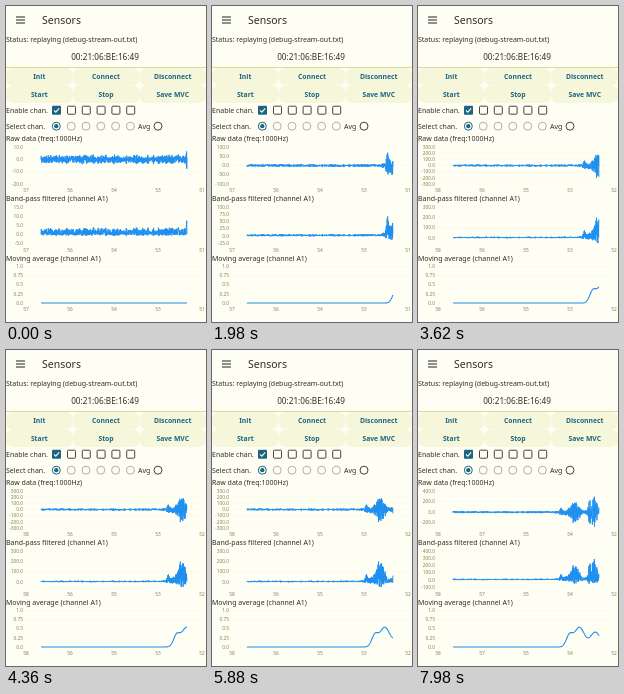
An HTML page for the animation above (8000 ms loop, 200 by 316 pixels).

```html
<!DOCTYPE html>
<html>
<head>
<meta charset="utf-8">
<style>
html, body { margin: 0; width: 100%; height: 100%; overflow: hidden; background: #fefef4; }
svg { display: block; width: 100%; height: 100%; font: 7px "Noto Sans", "Open Sans", sans-serif; fill: #2e2e22; }
.btn { font-weight: 600; font-size: 6.8px; fill: #1c6482; text-anchor: middle; }
.tick { font-size: 4.8px; fill: #85854c; }
.grid { stroke: #f6f6c4; stroke-width: .6; stroke-dasharray: 2 2; }
.line { fill: none; stroke: #2090f0; stroke-linejoin: round; }
</style>
</head>
<body>
<svg viewBox="0 0 200 316">
  <path d="M10 11h9M10 14h9M10 17h9" stroke="#222" stroke-width="1.2"/>
  <text x="36" y="18" font-size="10.5">Sensors</text>
  <text x="0" y="35.5">Status: replaying (debug-stream-out.txt)</text>
  <text x="99" y="54" font-size="8.2" text-anchor="middle">00:21:06:BE:16:49</text>
  <path d="M0 61.5H200" stroke="#dcdc9c"/>
  <g id="controls"></g>
  <text x="0" y="106.5">Enable chan.</text>
  <text x="0" y="122.8">Select chan.</text>
  <text x="132" y="122.8">Avg</text>
  <text x="0" y="135.3">Raw data (freq:1000Hz)</text>
  <text x="0" y="195.3">Band-pass filtered (channel A1)</text>
  <text x="0" y="255.3">Moving average (channel A1)</text>
  <g id="charts"></g>
</svg>
<script>
const $ = id => document.getElementById(id);
const LOOP = 8000, LEFT = 35, RIGHT = 181, ONSET = 180.5, SHIFT = 0.26, GAP = 0.13;

const bump = (w, center, width) => Math.exp(-(((w - center) / width) ** 2));

// Signal strength and moving average at distance w from the onset of activity
const strength = w => 3.3 + 7 * bump(w, 1, 0.9) + 82 * bump(w, 6.5, 3) + 265 * bump(w, 18.5, 5.5) + 380 * bump(w, 37, 5);
const mean = w => 0.3 * bump(w, 13.5, 4.5) + 0.53 * bump(w, 23.5, 7) + 0.4 * bump(w, 39.5, 7);

function rand(i) {
  const v = Math.sin(i * 12.9898) * 43758.5453;
  return v - Math.floor(v);
}

// Noise in -1..1, swelling in short groups
const noise = i => (2 * rand(i) - 1) * (0.45 + 0.55 * rand(Math.floor(i / 8) + 0.37));

// Data arrives in batches of 18 steps every 840 ms, with one longer stall
function stepAt(ms) {
  const t = 20 + (ms < 5060 ? ms : Math.max(5060, ms - 160));
  const batch = Math.floor(t / 840);
  return Math.max(0, 18 * batch + Math.min(18, 1 + Math.floor(t % 840 / 43.5)) - 5);
}

function peakAt(origin) {
  let peak = 0;
  for (let x = RIGHT; x > LEFT; x -= 0.5) peak = Math.max(peak, strength(x - origin));
  return peak;
}

// Finest round unit that covers the range in at most seven parts
function axis(high, low, units) {
  for (const unit of units) {
    const top = Math.ceil(high / unit) * unit, bottom = Math.floor(low / unit) * unit;
    const parts = (top - bottom) / unit;
    if (parts <= 7) return { top, bottom, tick: parts > 6 ? 2 * unit : unit };
  }
}

const label = (x, y, s, anchor) => `<text class="tick" x="${x}" y="${y + 1.7}" text-anchor="${anchor}">${s}</text>`;

function frame(y, height, step, { top, bottom, tick }, format) {
  let out = '';
  for (let v = top; v >= bottom; v -= tick) {
    const ty = y + (top - v) / (top - bottom) * height;
    out += `<path class="grid" d="M20 ${ty}H196"/>` + label(17, ty, format(v), 'end');
  }
  for (let i = 0; i < 5; i++)
    out += label(20 + 44 * i, y + 43, Math.round(57.05 + step * 0.0077 - 1.5 * i), 'middle');
  return out;
}

const curve = (points, width) => `<path class="line" stroke-width="${width}" d="M${points.join('L')}"/>`;

function signal(y, height, step, range, shape) {
  const scale = height / (range.top - range.bottom), zero = y + range.top * scale, origin = ONSET - step * SHIFT;
  const points = [];
  for (let i = Math.ceil((LEFT - origin) / GAP); i * GAP <= RIGHT - origin; i++) {
    const w = i * GAP, v = shape(noise(i), i) * (strength(w) * scale + 1);
    points.push((origin + w).toFixed(2) + ' ' + (zero - v).toFixed(2));
  }
  return frame(y, height, step, range, v => v.toFixed(1)) + curve(points, 0.9);
}

function average(step) {
  const origin = ONSET - step * SHIFT, points = [];
  for (let x = LEFT; x <= RIGHT; x += 0.5)
    points.push(x + ' ' + (297 - 37 * mean(x - origin)).toFixed(2));
  const format = v => v.toFixed(v * 2 % 1 ? 2 : 1);
  return frame(260.5, 36.5, step, { top: 1, bottom: 0, tick: 0.25 }, format) + curve(points, 1.1);
}

function controls() {
  let out = '';
  ['Init', 'Connect', 'Disconnect', 'Start', 'Stop', 'Save MVC'].forEach((name, i) => {
    const x = 66.7 * (i % 3), y = i < 3 ? 62 : 79.5;
    out += `<rect x="${x}" y="${y}" width="66.6" height="17.5" rx="7" fill="#f5f6da"/>
      <text class="btn" x="${x + 33.3}" y="${y + 11}">${name}</text>`;
  });
  const ring = (x, color) => `<circle cx="${x}" cy="120.2" r="4" fill="none" stroke="${color}"/>`;
  out += '<rect x="46" y="99.7" width="9" height="9" rx="1" fill="#1c6482"/>' +
    '<path d="M48 104.3l1.8 1.9 3.4-3.8" fill="none" stroke="#fff" stroke-width="1.1"/>';
  for (let i = 1; i < 6; i++) {
    const x = 50.7 + 14.8 * i;
    out += `<rect x="${x - 4}" y="100.2" width="8" height="8" rx="1" fill="none" stroke="#44443c"/>` + ring(x - .3, '#b2b297');
  }
  return out + ring(50.3, '#1c6482') + '<circle cx="50.3" cy="120.2" r="2.1" fill="#1c6482"/>' + ring(152, '#44443c');
}

$('controls').innerHTML = controls();
let shown = -1;

function draw(now) {
  const step = stepAt(now % LOOP);
  if (step !== shown) {
    shown = step;
    const peak = peakAt(ONSET - step * SHIFT);
    const rawRange = axis(0.8 * peak, -Math.min(1.1 * peak, 300), [10, 50, 100]);
    const bandRange = axis(peak + 5, -0.15 * peak, [5, 25, 50, 100]);
    $('charts').innerHTML =
      signal(141, 37, step, rawRange, n => n) +
      signal(201, 36, step, bandRange, (n, i) => Math.abs(n) * (rand(i + 0.5) < 0.25 ? -0.3 : 1)) +
      average(step);
  }
  requestAnimationFrame(draw);
}
draw(0);
</script>
</body>
</html>
```
